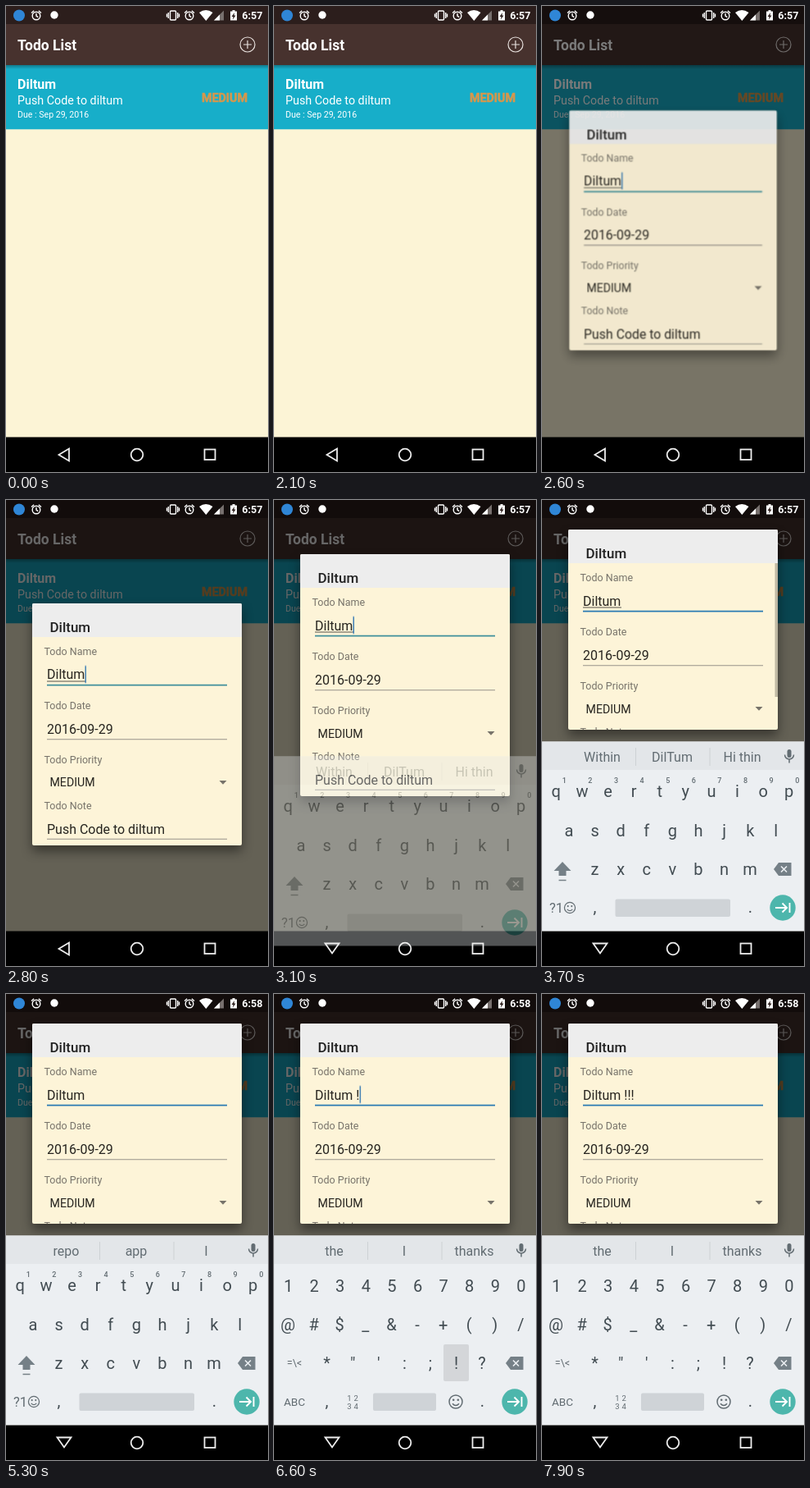
These frames come from a looping animation (320 by 568 pixels, 8000 ms). An HTML page:

```html
<!DOCTYPE html>
<html lang="en">
<head>
<meta charset="utf-8">
<title>Todo List</title>
<style>
  html, body { margin: 0; width: 100%; height: 100%; overflow: hidden; background: #000; }
  #stage { position: absolute; left: 0; top: 0; width: 320px; height: 568px; overflow: hidden; }
  #stage > * { position: absolute; left: 0; top: 0; }
  svg { display: block; }
  text { font-family: Roboto, "Noto Sans", sans-serif; white-space: pre; }
  .mid { text-anchor: middle; }
  .line { fill: none; stroke-linecap: butt; }
  #dim { width: 320px; height: 526px; background: #000; }
  #stage > #card {
    left: 32px; top: 126px; width: 256px; height: 295px; overflow: hidden;
    border-radius: 2px; background: #fdf4d8; box-shadow: 0 7px 14px rgba(0,0,0,.45);
  }
  .label { font-size: 12.5px; fill: #77736a; }
  .field { font-size: 16px; fill: #26241f; }
  .key { font-size: 20px; fill: #424c52; text-anchor: middle; }
  .hint { font-size: 9px; font-weight: 500; fill: #626c72; text-anchor: middle; }
  .word { font-size: 16px; fill: #626c72; text-anchor: middle; }

  /* Every change lands on a 100 ms tick: 1.25% of the loop. */
  .a { animation: 8s step-end -20ms infinite; }
  #dim { animation-name: dim; }
  #card { animation-name: card; }
  #keyboard { animation-name: keyboard; }
  .back { animation-name: before-keyboard; }
  .down { animation-name: after-keyboard; }
  .accent { animation-name: accent; }
  .scroll { animation-name: scroll; }
  .caret { animation-name: caret; }
  .early { animation-name: early; }
  .late { animation-name: late; }
  .next { animation-name: next; }
  .last, .m1 { animation-name: first-mark; }
  .m2 { animation-name: second-mark; }
  .m3 { animation-name: third-mark; }
  .letters { animation-name: letters; }
  .symbols { animation-name: symbols; }
  .press-space { animation-name: press-space; }
  .press-mode { animation-name: press-mode; }
  .press-mark { animation-name: press-mark; }

  @keyframes dim {
    0% { opacity: 0; } 31.25% { opacity: .28; } 32.5% { opacity: .52; } 33.75%, 100% { opacity: .6; }
  }
  @keyframes card {
    0% { opacity: 0; transform: scale(.9); }
    31.25% { opacity: .45; transform: scale(.96); }
    32.5% { opacity: .92; transform: scale(.99); }
    33.75% { opacity: 1; transform: none; top: 126px; height: 295px; }
    38.75% { opacity: 1; transform: none; top: 66px; height: 295px; }
    40% { opacity: 1; transform: none; top: 37px; height: 295px; }
    41.25%, 100% { opacity: 1; transform: none; top: 36px; height: 244px; }
  }
  @keyframes keyboard {
    0% { opacity: 0; transform: translateY(23px); }
    38.75% { opacity: .35; transform: translateY(18px); }
    40% { opacity: .87; transform: translateY(6px); }
    41.25% { opacity: .98; transform: translateY(1px); }
    42.5%, 100% { opacity: 1; transform: none; }
  }
  @keyframes before-keyboard { 0% { visibility: visible; } 38.75%, 100% { visibility: hidden; } }
  @keyframes after-keyboard { 0% { visibility: hidden; } 38.75%, 100% { visibility: visible; } }
  @keyframes accent { 0% { stroke: #3f8f9c; } 41.25%, 100% { stroke: #2b7bb3; } }
  @keyframes scroll {
    0% { opacity: 0; } 41.25% { opacity: .24; } 47.5% { opacity: .1; } 48.75%, 100% { opacity: 0; }
  }
  @keyframes caret {
    0% { opacity: 1; transform: none; }
    46.25% { opacity: 0; transform: none; }
    53.75% { opacity: 1; transform: none; }
    60% { opacity: 1; transform: translateX(4px); }
    66.25% { opacity: 0; transform: translateX(4px); }
    72.5% { opacity: 1; transform: translateX(4px); }
    78.75% { opacity: 0; transform: translateX(4px); }
    80% { opacity: 1; transform: translateX(8.1px); }
    83.75% { opacity: 1; transform: translateX(12.2px); }
    86.25% { opacity: 1; transform: translateX(16.3px); }
    92.5%, 100% { opacity: 0; transform: translateX(16.3px); }
  }
  @keyframes early { 0% { visibility: visible; } 60%, 100% { visibility: hidden; } }
  @keyframes late { 0% { visibility: hidden; } 60%, 100% { visibility: visible; } }
  @keyframes next { 0% { visibility: hidden; } 60% { visibility: visible; } 80%, 100% { visibility: hidden; } }
  @keyframes first-mark { 0% { visibility: hidden; } 80%, 100% { visibility: visible; } }
  @keyframes second-mark { 0% { visibility: hidden; } 83.75%, 100% { visibility: visible; } }
  @keyframes third-mark { 0% { visibility: hidden; } 86.25%, 100% { visibility: visible; } }
  @keyframes letters { 0% { visibility: visible; } 71.25%, 100% { visibility: hidden; } }
  @keyframes symbols { 0% { visibility: hidden; } 71.25%, 100% { visibility: visible; } }
  @keyframes press-space { 0% { opacity: 0; } 58.75% { opacity: .12; } 60%, 100% { opacity: 0; } }
  @keyframes press-mode { 0% { opacity: 0; } 71.25% { opacity: .1; } 72.5%, 100% { opacity: 0; } }
  @keyframes press-mark {
    0% { opacity: 0; } 78.75% { opacity: .1; } 80% { opacity: 0; } 82.5% { opacity: .1; }
    83.75% { opacity: 0; } 85% { opacity: .1; } 86.25%, 100% { opacity: 0; }
  }
</style>
</head>
<body>
<div id="stage">

  <svg width="320" height="568">
    <defs>
      <linearGradient id="shade" x2="0" y2="1">
        <stop offset="0" stop-opacity=".3"/><stop offset="1" stop-opacity="0"/>
      </linearGradient>
    </defs>
    <rect width="320" height="526" fill="#fcf4d6"/>
    <rect y="72" width="320" height="78.3" fill="#17aec9"/>
    <rect y="72" width="320" height="5" fill="url(#shade)"/>
    <rect width="320" height="72" fill="#47322e"/>
    <rect width="320" height="22" fill="#2c1e1c"/>
    <g fill="#fff">
      <text x="14" y="54" font-size="17.5" font-weight="700">Todo List</text>
      <text x="14" y="100.5" font-size="16" font-weight="700">Diltum</text>
      <text x="14" y="119.5" font-size="14.3">Push Code to diltum</text>
      <text x="14" y="135.5" font-size="10.6">Due : Sep 29, 2016</text>
    </g>
    <text x="239" y="116.5" font-size="14.3" font-weight="700" fill="#d6974c" stroke="#d6974c" stroke-width=".5">MEDIUM</text>
    <g class="line" stroke="#e6dfdc" stroke-width="1.2">
      <circle cx="295" cy="47" r="9"/>
      <path d="M290 47h10M295 42v10"/>
    </g>
    <rect y="525.5" width="320" height="43" fill="#000"/>
  </svg>

  <div id="dim" class="a"></div>

  <div id="card" class="a">
    <svg width="256" height="295" viewBox="32 126 256 295">
      <rect x="32" y="126" width="256" height="41" fill="#ededed"/>
      <text x="53.5" y="161.3" font-size="17" font-weight="500" fill="#222">Diltum</text>
      <g transform="translate(0 .5)">
        <g class="label">
          <text x="46.5" y="188.5">Todo Name</text>
          <text x="46.5" y="254.5">Todo Date</text>
          <text x="46.5" y="320.5">Todo Priority</text>
          <text x="46.5" y="376.5">Todo Note</text>
        </g>
        <g class="field">
          <text x="50" y="218">Diltum <tspan class="a m1">!</tspan><tspan class="a m2">!</tspan><tspan class="a m3">!</tspan></text>
          <text x="50" y="284.5">2016-09-29</text>
          <text x="53.5" y="349" font-size="14.2">MEDIUM</text>
          <text x="50" y="406.5">Push Code to diltum</text>
        </g>
        <path class="a early" d="M50 220.5h47" stroke="#55524b"/>
        <path class="a accent" d="M50 225.2h220" stroke-width="1.8"/>
        <path d="M50 291.2h220M50 412.8h220" stroke="#98938a" stroke-width="1.1"/>
        <path d="M260.5 341.5h9l-4.5 4.8z" fill="#77736a"/>
        <rect class="a caret" x="96.5" y="201.5" width="1.5" height="21" fill="#3f7fb5"/>
      </g>
      <rect class="a scroll" x="284.5" y="167" width="3.5" height="163"/>
    </svg>
  </div>

  <svg width="320" height="568">
    <g id="keyboard" class="a">
      <rect y="294.5" width="320" height="231" fill="#eceff2"/>
      <rect y="294.5" width="320" height="34.5" fill="#e3e6e9"/>
      <path d="M114.5 302v22M205 302v22" stroke="#cdd1d4"/>
      <g id="words"></g>
      <rect x="299.5" y="304" width="5" height="10" rx="2.5" fill="#626c72"/>
      <path class="line" d="M296.5 310.5a5.500 5.500 0 0 0 11 0M302 316v4.500" stroke="#626c72" stroke-width="1.5"/>
      <g id="letters" class="a letters">
        <path d="M25 441l10.5 11h-6v6h-9v-6h-6z" fill="#758087"/>
        <path d="M20.5 463.5h9" stroke="#758087" stroke-width="1.5"/>
        <rect x="89.5" y="486.5" width="140.5" height="21.5" rx="2" fill="#cfd3d7"/>
        <rect class="a press-space" x="89.5" y="486.5" width="140.5" height="21.5" rx="2"/>
        <text x="9" y="503" font-size="16.5" fill="#626c72">?1</text>
        <g class="smile" transform="translate(34 497) scale(.82)"></g>
      </g>
      <g id="symbols" class="a symbols">
        <rect x="121" y="486.5" width="77" height="21.5" rx="2" fill="#cfd3d7"/>
        <rect class="a press-mode" x="8" y="479" width="36" height="37" rx="2"/>
        <rect class="a press-mark" x="207" y="427" width="31" height="45" rx="2"/>
        <g fill="#626c72" class="mid">
          <text x="25" y="454" font-size="12.5">=\&lt;</text>
          <text x="25" y="502" font-size="13.5">ABC</text>
          <text x="97.5" y="496" font-size="9.5" letter-spacing="3">12</text>
          <text x="97.5" y="506" font-size="9.5" letter-spacing="3">34</text>
        </g>
        <g class="smile" transform="translate(222 497)"></g>
      </g>
      <text class="key" x="64.5" y="503">,</text>
      <text class="key" x="254.5" y="503">.</text>
      <path d="M283 450l6-8h15.5v16h-15.5z" fill="#758087"/>
      <path class="line" d="M292 446.5l7 7m0-7l-7 7" stroke="#eceff2" stroke-width="1.6"/>
      <circle cx="294" cy="497" r="15.7" fill="#4db6ac"/>
      <path class="line" d="M285 497h13.5M293.5 491.5l5.5 5.5l-5.5 5.5M302.5 491v12" stroke="#fff" stroke-width="1.9"/>
    </g>

    <g class="line" stroke="#eee" stroke-width="1.8">
      <path class="a back" d="M64.5 547l12.5-7.5v15z"/>
      <path class="a down" d="M62.5 540.5h17l-8.5 12z"/>
      <circle cx="160" cy="547" r="7.3"/>
      <rect x="242.5" y="540.5" width="13" height="12.5"/>
    </g>

    <circle cx="16" cy="11.5" r="7" fill="#2f86d6"/>
    <circle cx="59" cy="11" r="4.7" fill="#fff"/>
    <g class="line" stroke="#fff" stroke-width="1.4">
      <g id="alarm">
        <circle cx="37" cy="12" r="4.8"/>
        <path d="M37 9v3.2l2.3 1.4M31 8.5l3.2-2.8M43 8.5l-3.2-2.8"/>
      </g>
      <use href="#alarm" x="187"/>
      <rect x="200.5" y="6" width="7" height="11" rx="1"/>
      <path d="M198.3 8v7M209.7 8v7M196.5 9.5v4M211.5 9.5v4"/>
    </g>
    <path d="M236 8q8-6 16.5 0l-8.2 10z" fill="#fff"/>
    <path d="M254 17.5l12-12v12z" fill="#77706e"/>
    <path d="M254 17.5l7-7v7z" fill="#fff"/>
    <path d="M274 6.5h2.5v-1.5h3v1.5h2.5v11h-8z" fill="#fff"/>
    <path d="M279 8l-3.5 5h2l-.5 3.500l3.500-5h-2z" fill="#2c1e1c"/>
    <g font-size="12.5" font-weight="700" fill="#fff">
      <text class="a early" x="288.3" y="16">6:57</text>
      <text class="a late" x="288.3" y="16">6:58</text>
    </g>
  </svg>
</div>

<script>
  const $ = id => document.getElementById(id);
  const PITCH = 31.6;

  function addText(parent, content, x, y, className) {
    const el = document.createElementNS("http://www.w3.org/2000/svg", "text");
    el.textContent = content;
    el.setAttribute("x", x);
    el.setAttribute("y", y);
    el.setAttribute("class", className);
    parent.append(el);
  }

  function addRow(parent, chars, x, y, className = "key") {
    [...chars].forEach((c, i) => addText(parent, c, x + i * PITCH, y, className));
  }

  const letters = $("letters"), symbols = $("symbols");
  addRow(letters, "qwertyuiop", 17.3, 362);
  addRow(letters, "1234567890", 27.3, 344.6, "hint");
  addRow(letters, "asdfghjkl", 33, 410);
  addRow(letters, "zxcvbnm", 64.5, 457);

  addRow(symbols, "1234567890", 17.5, 362.5);
  addRow(symbols, "@#$_&-+()/", 17, 410);
  addRow(symbols, "*\"':;!?", 64.5, 457);

  for (const face of document.querySelectorAll(".smile")) {
    face.innerHTML = `
      <g class="line" stroke="#626c72" stroke-width="1.5">
        <circle r="8"/><path d="M-4 2.2q4 4.6 8 0"/>
      </g>
      <g fill="#626c72"><circle cx="-2.8" cy="-2.3" r="1.3"/><circle cx="2.8" cy="-2.3" r="1.3"/></g>`;
  }

  const suggestions = {
    early: ["Within", "DilTum", "Hi thin"],
    next: ["repo", "app", "I"],
    last: ["the", "I", "thanks"]
  };
  for (const [phase, words] of Object.entries(suggestions)) {
    words.forEach((word, i) => addText($("words"), word, 73.5 + i * 85.5, 318.5, `word a ${phase}`));
  }
</script>
</body>
</html>
```
